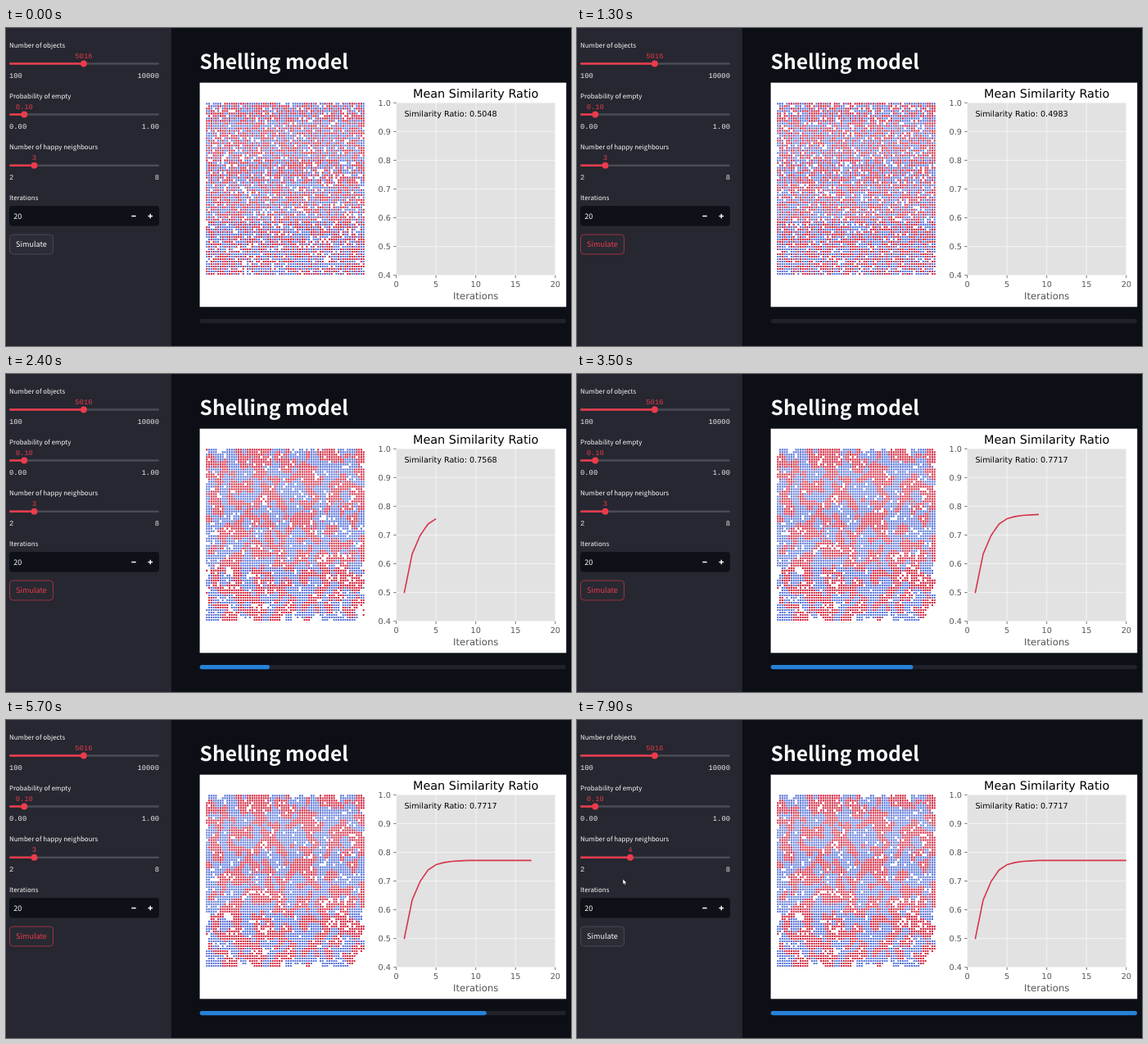
An HTML page that plays this animation: 690x388 px, repeating every 8000 ms.

```html
<!DOCTYPE html>
<html lang="en">
<head>
<meta charset="utf-8">
<title>Shelling model</title>
<style>
  html, body { margin: 0; width: 100%; height: 100%; overflow: hidden; background: #0c0f16; }
  svg { display: block; width: 690px; height: 388px; text-rendering: geometricPrecision; }
  .ui { font: 500 7.95px "Noto Sans CJK JP", "Noto Sans CJK SC", "Noto Sans", sans-serif; fill: #fafafa; }
  .big { font-size: 9.1px; }
  .mono { font: 8.85px "Liberation Mono", monospace; fill: #e8e8ea; }
  .value { fill: #e23a4a; }
  .plot { font: 9.7px "DejaVu Sans", sans-serif; fill: #555; }
  .mid { text-anchor: middle; }
  .end { text-anchor: end; }
</style>
</head>
<body>
<svg id="stage" viewBox="0 0 690 388"></svg>
<script>
const LOOP = 8000, FIRST = 1170, STEP = 278, SIZE = 70;
const RED = '#ec3b4c', WHITE = '#fafafa';
const SIMILARITY = [.4983, .6342, .6987, .7384, .7568, .7645, .7683, .7702, .7717];

const text = (x, y, cls, str, extra = '') => `<text x="${x}" y="${y}" class="${cls}" ${extra}>${str}</text>`;
const rect = (x, y, w, h, fill, extra = '') =>
  `<rect x="${x}" y="${y}" width="${w}" height="${h}" fill="${fill}" ${extra}/>`;
const line = (d, color, width) => `<path d="${d}" stroke="${color}" stroke-width="${width}" fill="none"/>`;
const chartX = n => 476.6 + 9.71 * n;
const chartY = v => 301.7 - (v - .4) * 350.7;

function slider(id, y, label, min, max, value, x) {
  return text(4, y - 20, 'ui', label)
    + rect(4, y - 1.2, 183, 2.4, '#4a4b55', 'rx="1.2"')
    + rect(4, y - 1.2, x - 4, 2.4, RED, `rx="1.2" id="${id}Fill"`)
    + `<circle cx="${x}" cy="${y}" r="3.9" fill="${RED}" id="${id}Thumb"/>`
    + text(x, y - 7, 'mono value mid', value, `id="${id}Value"`)
    + text(4, y + 17.3, 'mono', min) + text(187, y + 17.3, 'mono end', max);
}

function chart() {
  let grid = '', ticks = '', labels = '';
  for (let n = 0; n <= 20; n += 5) {
    const x = chartX(n);
    grid += `M${x} 91V301.7`;
    ticks += `M${x} 301.7v3.4`;
    labels += text(x, 316.3, 'plot mid', n);
  }
  for (let i = 4; i <= 10; i++) {
    const y = chartY(i / 10);
    grid += `M476.6 ${y}H670.8`;
    ticks += `M476.6 ${y}h-3.4`;
    labels += text(470, y + 3.6, 'plot end', (i / 10).toFixed(1));
  }
  return rect(476.6, 91, 194.2, 210.7, '#e2e2e2')
    + line(grid, '#f7f7f7', .9) + line(ticks, '#555', .8) + labels
    + text(573.7, 85.2, 'plot mid', 'Mean Similarity Ratio', 'style="font-size:14.4px;fill:#000"')
    + text(573.7, 330.8, 'plot mid', 'Iterations', 'style="font-size:11.6px"')
    + text(486.4, 108.4, 'plot', '', 'id="ratio" style="font-size:9.65px;fill:#000"')
    + '<path id="curve" fill="none" stroke="#d4374a" stroke-width="1.6" stroke-linejoin="round"/>';
}

document.getElementById('stage').innerHTML =
  rect(0, 0, 202, 388, '#262730')
  + slider('count', 43.5, 'Number of objects', '100', '10000', '5016', 94.9)
  + slider('empty', 105.5, 'Probability of empty', '0.00', '1.00', '0.10', 22.3)
  + slider('happy', 167.7, 'Number of happy neighbours', '2', '8', '3', 34.5)
  + text(4, 209.8, 'ui', 'Iterations')
  + rect(4, 217, 183, 24.5, '#0e1117', 'rx="4"')
  + text(9.3, 233, 'ui big', '20')
  + line('M153.3 229.5h5.4M173.5 229.5h5.6M176.3 226.7v5.6', WHITE, 1.4)
  + rect(4.5, 252, 53, 24, '#2b2c36', 'rx="4" id="button" stroke-width=".8"')
  + text(31, 267.4, 'ui big mid', 'Simulate', 'id="buttonText"')
  + text(236.6, 49.8, 'ui', 'Shelling model', 'style="font-size:24.6px;font-weight:700"')
  + rect(236.6, 66.7, 447.6, 273.6, '#fff')
  + '<path id="reds" fill="#d0203a"/><path id="blues" fill="#5470d6"/>'
  + chart()
  + rect(236.7, 355, 447.3, 5.2, '#20222b', 'rx="2.6"')
  + rect(236.7, 355, 0, 5.2, '#2681d8', 'rx="2.6" id="progress"')
  + '<path id="cursor" d="M0 0V6.6L1.6 5.2L2.7 7.6L3.8 7.1L2.8 4.8H4.8Z" fill="#fff" stroke="#111" stroke-width=".5"/>';

const $ = id => document.getElementById(id);
const set = (id, attrs) => { for (const a in attrs) $(id).setAttribute(a, attrs[a]); };

function seeded(seed) {
  return () => {
    seed = seed + 0x6D2B79F5 | 0;
    let r = Math.imul(seed ^ seed >>> 15, 1 | seed);
    r = r + Math.imul(r ^ r >>> 7, 61 | r) ^ r;
    return ((r ^ r >>> 14) >>> 0) / 4294967296;
  };
}

const randomCity = rnd => Array.from({ length: SIZE * SIZE }, () => rnd() < .1 ? 0 : rnd() < .5 ? 1 : 2);

function isUnhappy(city, cell) {
  const row = Math.floor(cell / SIZE), col = cell % SIZE;
  let same = -1; // the resident itself is counted below
  for (let r = Math.max(0, row - 1); r <= Math.min(SIZE - 1, row + 1); r++)
    for (let c = Math.max(0, col - 1); c <= Math.min(SIZE - 1, col + 1); c++)
      if (city[r * SIZE + c] === city[cell]) same++;
  return same < 3;
}

// Every unhappy resident moves to a random empty house.
function moveAll(city, rnd) {
  const next = city.slice(), empty = [];
  next.forEach((kind, cell) => { if (!kind) empty.push(cell); });
  for (let cell = 0; cell < next.length; cell++) {
    if (!next[cell] || !isUnhappy(next, cell)) continue;
    const pick = Math.floor(rnd() * empty.length), target = empty[pick];
    next[target] = next[cell];
    next[cell] = 0;
    empty[pick] = cell;
  }
  return next;
}

function dots(city, kind) {
  let d = '';
  city.forEach((k, cell) => {
    if (k !== kind) return;
    const x = 244.3 + cell % SIZE * 2.774, y = 91.3 + Math.floor(cell / SIZE) * 3.01;
    d += `M${x.toFixed(2)} ${y.toFixed(2)}h2v2.1h-2z`;
  });
  return d;
}

const rnd = seeded(11);
const cities = [randomCity(seeded(5)), randomCity(rnd)];
while (cities.length <= SIMILARITY.length) cities.push(moveAll(cities[cities.length - 1], rnd));
const pictures = cities.map(city => [dots(city, 1), dots(city, 2)]);

const similarity = n => SIMILARITY[Math.min(n, SIMILARITY.length) - 1];
let shown = -1;

function showIteration(n) {
  if (n === shown) return;
  shown = n;
  const [reds, blues] = pictures[Math.min(n, pictures.length - 1)];
  set('reds', { d: reds });
  set('blues', { d: blues });
  $('ratio').textContent = 'Similarity Ratio: ' + (n ? similarity(n) : .5048).toFixed(4);
  let d = '';
  for (let i = 1; i <= n; i++) d += `${i > 1 ? 'L' : 'M'}${chartX(i)} ${chartY(similarity(i))}`;
  set('curve', { d: n > 1 ? d : '' });
}

function draw() {
  const t = performance.now() % LOOP;

  const step = Math.max(0, Math.min(21, Math.floor((t - FIRST) / STEP) + 1));
  showIteration(Math.min(step, 20));

  const u = Math.min(1, (t - FIRST - (step - 1) * STEP) / STEP);
  const done = step > 1 ? (step - 1 - (1 - u) ** 3) / 20 : 0;
  set('progress', { width: 447.3 * done });

  const hover = t >= 700 && t < 7200;
  set('button', { stroke: hover ? '#b83646' : '#50515a', fill: hover ? '#282932' : '#2b2c36' });
  $('buttonText').style.fill = hover ? RED : WHITE;

  const happy = t < 7500 ? 3 : 4, x = 4 + (happy - 2) * 30.5;
  set('happyFill', { width: x - 4 });
  set('happyThumb', { cx: x });
  set('happyValue', { x });
  $('happyValue').textContent = happy;

  const away = Math.min(1, Math.max(0, (t - 7650) / 250));
  set('cursor', {
    visibility: away > 0 ? 'visible' : 'hidden',
    transform: `translate(${65 - 9 * away} ${170 + 24 * away})`
  });
  requestAnimationFrame(draw);
}
draw();
</script>
</body>
</html>
```
